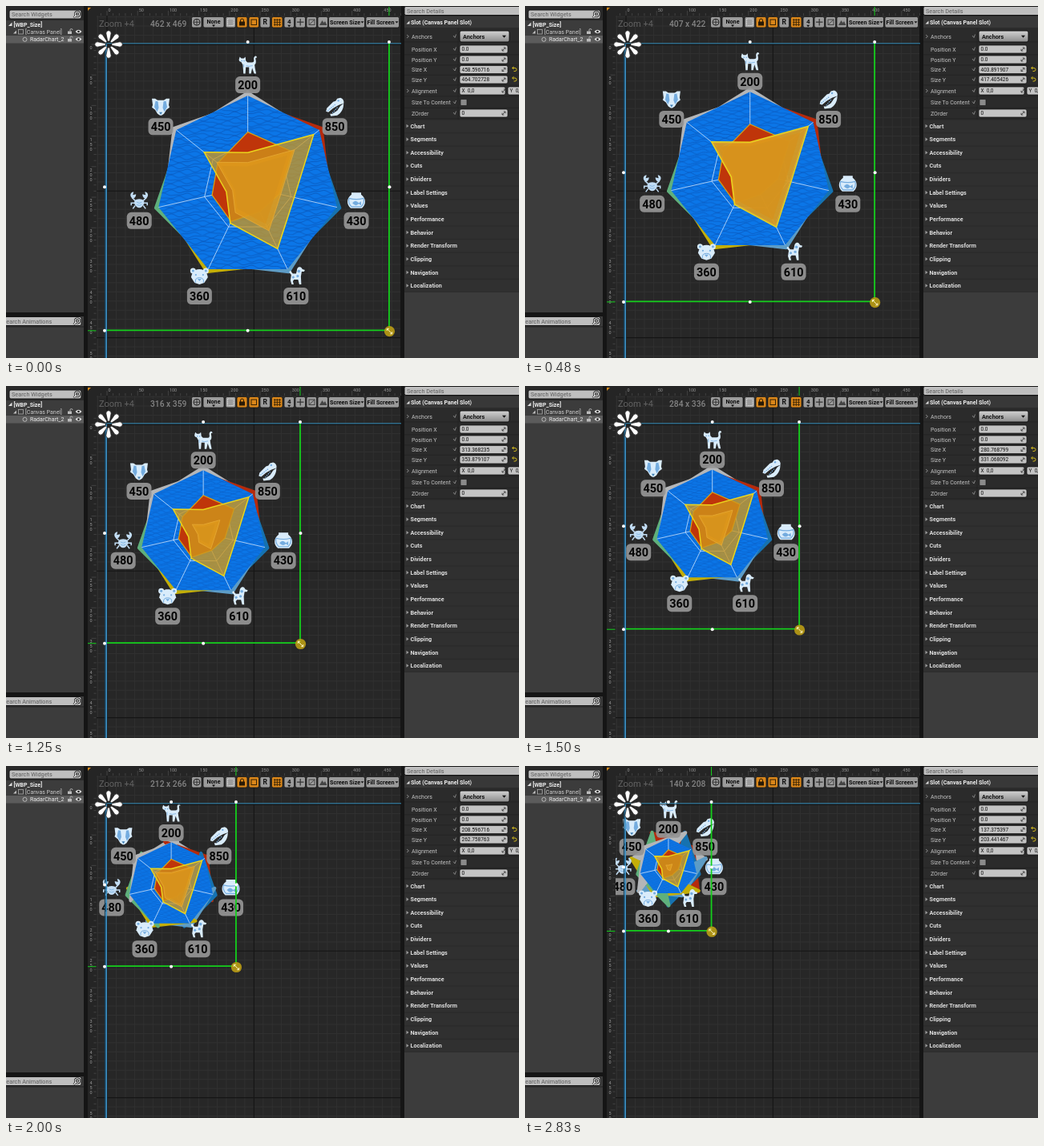
An HTML page for the animation above (2.9 s loop, 640x440 px).

```html
<!DOCTYPE html>
<html lang="en">
<head>
<meta charset="utf-8">
<title>Radar chart resize</title>
<style>
html, body { margin: 0; width: 100%; height: 100%; overflow: hidden; background: #272727; }
svg { display: block; width: 640px; height: 440px; font-family: Roboto, sans-serif; }
</style>
</head>
<body>
<svg id="stage" viewBox="0 0 640 440">
  <defs>
    <clipPath id="view"><path d="M113 12H493V440H113z"/></clipPath>
    <linearGradient id="btn" x2="0" y2="1"><stop stop-color="#d2d2d2"/><stop offset="1" stop-color="#8c8c8c"/></linearGradient>
  </defs>
  <g id="back"></g>
  <g id="chart" clip-path="url(#view)"></g>
  <g id="front"></g>
  <g id="overlay"></g>
  <g id="panels"></g>
  <g id="sizes"></g>
</svg>
<script>
const $ = id => document.getElementById(id);
const LOOP = 2900, SCALE = 0.764, OX = 125.3, OY = 47;

// [step, time] anchors of the screen capture clock
const CLOCK = [[0,0],[1,50],[8,480],[10,620],[15,930],[18,1130],[19,1180],[24,1500],
  [27,1690],[28,1760],[32,2000],[36,2250],[37,2320],[39,2440],[45,2830],[46,2900]];
// [step, size x, size y, dragged height]
const DRAG = [[0,458.596716,464.702728,469],[8,403.891907,417.405426,422],
  [15,352.090118,379.117126,384],[24,280.768799,331.068092,336],
  [32,208.596716,262.758763,266],[39,152.390411,216.453461,220],[45,137.375397,203.441467,208]];

const rect = (x, y, w, h, fill, more = '') =>
  `<rect x="${x}" y="${y}" width="${w}" height="${h}" fill="${fill}" ${more}/>`;
const path = (d, fill, more = '') => `<path d="${d}" fill="${fill}" ${more}/>`;
const line = (d, color, w = 1, more = '') => path(d, 'none', `stroke="${color}" stroke-width="${w}" ${more}`);
const dot = (x, y, r, fill, more = '') => `<circle cx="${x}" cy="${y}" r="${r}" fill="${fill}" ${more}/>`;
const text = (x, y, s, size, fill, more = '') =>
  `<text x="${x}" y="${y}" font-size="${size}" fill="${fill}" ${more}>${s}</text>`;
const BOLD = ' font-weight="700"', MID = ' text-anchor="middle"';

/* ---------- static parts ---------- */

function drawBack() {
  let s = rect(102, 0, 392, 440, '#272727'), minor = '', major = '';
  const gap = 183.3 / 16;
  for (let i = -3; i < 36; i++) {
    const x = 126 + i * gap, y = 48 + i * gap;
    const v = x > 113 && x < 493 ? `M${x} 12V440` : '', h = y > 12 ? `M113 ${y}H493` : '';
    if (i % 16) minor += v + h; else major += v + h;
  }
  s += line(minor, '#313131') + line(major, '#151515', 1.1);
  s += text(116, 26, 'Zoom +4', 11, '#626262');
  return s;
}

function drawRulers() {
  let s = rect(102, 0, 391, 12, '#252525') + rect(102, 12, 10.5, 428, '#252525'), ticks = '';
  for (let i = -1; i < 53; i++) {
    const p = i * 50 * SCALE / 5, len = i % 5 ? 3 : 6;
    if (126 + p < 493) ticks += `M${126 + p} 12v${-len}`;
    ticks += `M112.5 ${48 + p}h${-len}`;
  }
  s += line(ticks, '#555', .6);
  for (let n = 0; n <= 500; n += 50) {
    const p = n * SCALE;
    if (n < 500) s += text(127.5 + p, 7, n, 5.5, '#999');
    [...String(n)].forEach((c, i) => s += text(104.5, 54 + p + i * 6, c, 5.5, '#999'));
  }
  return s + path('M102 2h4l-4 4z', '#d88a1c');
}

function drawFrame() {
  let s = line('M113 46.8H493', '#3585ad', 1.3) + line('M113 48.2H493', '#141414', .8);
  s += line('M123.4 48V440', '#15425e', 1) + line('M125.2 48V440', '#3990c6', 1.7);
  for (let a = 0; a < 360; a += 45)
    s += path('M-1.2 -4L-3.2 -14Q-3 -17 0 -17.3Q3 -17 3.2 -14L1.2 -4z', '#fff',
      `transform="translate(128 48) rotate(${a})" stroke="#222" stroke-width=".7"`);
  return s;
}

function drawToolbar() {
  const box = (x, w, fill = '#9b9b9b') =>
    rect(x, 13.5, w, 13.5, fill, 'rx="2" stroke="#1a1a1a" stroke-width=".8"');
  const orange = '#d9861a', word = (x, s) => text(x, 23, s, 7.2, '#0c0c0c', BOLD);
  const caret = (x, y) => path(`M${x} ${y}h4l-2 2.4z`, '#111');
  return box(231.5, 12.5) + dot(238, 20.2, 4, 'none', 'stroke="#222"') + line('M234 20.2h8M238 16v8', '#222', .8)
    + box(246, 26) + text(259, 21.5, 'None', 7.2, '#0c0c0c', BOLD + MID) + caret(257, 23.6)
    + box(274, 12.5) + rect(276.5, 16, 7.5, 8.5, 'none', 'stroke="#ddd" stroke-dasharray="1.5 .8"')
    + box(288, 13, orange) + rect(291, 19.5, 7, 5, '#2a1a05') + line('M292.5 20v-2a2 2 0 0 1 4 0v2', '#2a1a05')
    + box(303, 12.5, orange) + rect(306, 17, 6.5, 6.5, 'none', 'stroke="#3a2405"')
    + box(317, 12.5) + text(323.2, 23.3, 'R', 8.5, '#111', BOLD + MID)
    + box(331.5, 13.5, orange) + line('M334 17.3h9M334 20.3h9M334 23.3h9M335.2 16v9M338.3 16v9M341.4 16v9', '#3a2405', .9)
    + box(347, 12.5) + text(353.2, 21.6, '4', 8, '#111', BOLD + MID) + caret(351.2, 23.8)
    + box(361, 12.5) + line('M363 20.2h8.5M367.2 16v8.5', '#333', 1.2)
    + box(375, 12.5) + rect(378, 17, 7, 6.5, 'none', 'stroke="#444"') + line('M378 23.5l7 -6.5', '#444')
    + box(389, 12.5) + path('M391 24l3.5 -6 2 3 1.5 -2 2.5 5z', '#444')
    + box(402.5, 45) + word(404, 'Screen Size') + caret(442.5, 19.2)
    + box(449, 41.5) + word(450.5, 'Fill Screen') + caret(485.5, 19.2);
}

const lens = (x, y) => line(`M${x - 2} ${y + 2}l-2.5 2.5`, '#111', 2.4)
  + dot(x, y, 2.8, '#888', 'stroke="#111" stroke-width="2.2"') + dot(x, y, 2.8, 'none', 'stroke="#fff"')
  + line(`M${x - 2} ${y + 2}l-2.3 2.3`, '#fff', 1.2);
const search = (x, y, w, s) => rect(x, y, w, 11, '#bebebe', 'rx="2" stroke="#161616"') + text(x + 3, y + 8.2, s, 7.3, '#5c5c5c');

function drawLeft() {
  const eye = y => path(`M86.5 ${y}q4 -4.5 8 0q-4 4.5 -8 0z`, '#ddd') + dot(90.5, y, 1.3, '#222');
  const lock = y => rect(77, y - 1, 5, 3.5, '#bbb') + line(`M80 ${y - 1}v-1.5a1.5 1.5 0 0 1 3 0`, '#bbb', .9);
  return rect(0, 0, 98, 440, '#3c3c3c') + rect(0, 0, 98, 18, '#2a2a2a') + search(4, 5, 90, 'Search Widgets') + lens(89, 10)
    + path('M3 25h4.5v-4.5z', '#ddd') + text(9.5, 25.5, '[WBP_Size]', 7, '#eee', BOLD)
    + path('M9 34.5h4v-4z', '#bbb') + rect(15.5, 29.5, 6, 5.5, 'none', 'stroke="#aaa" stroke-width=".8"')
    + text(24, 35, '[Canvas Panel]', 7, '#ccc') + lock(32.5) + eye(32)
    + rect(0, 37, 97, 9.5, '#5c5c5c') + dot(23.5, 41.8, 2.5, 'none', 'stroke="#ccc" stroke-width=".8"')
    + text(30, 44.3, 'RadarChart_2', 7, '#eee') + lock(42) + eye(41.6)
    + rect(0, 383, 98, 5, '#151515') + search(-7, 388.5, 101, 'Search Animations') + lens(89, 393.5)
    + rect(0, 400.5, 98, 1, '#222') + rect(97, 0, 5, 440, '#151515');
}

const field = (x, y, w) => rect(x, y - 5, w, 10, '#c4c4c4', 'rx="2" stroke="#111" stroke-width=".7"');
const spin = y => line(`M619 ${y + 2}l4 -4M620.7 ${y - 2}h2.3v2.3M619 ${y - .3}v2.3h2.3`, '#333', .8);

function drawRight() {
  let s = rect(493, 0, 4, 440, '#151515') + rect(497, 0, 143, 440, '#3c3c3c') + rect(497, 0, 143, 358, '#2b2b2b')
    + search(497, 0.5, 150, 'Search Details') + rect(497, 13, 143, 14, '#383838')
    + path('M499.5 22.5h4v-4z', '#ddd') + text(505, 23, 'Slot (Canvas Panel Slot)', 7, '#eee', BOLD);
  const rows = [['Anchors', 38], ['Position X', 54], ['Position Y', 67], ['Size X', 79.5], ['Size Y', 92],
    ['Alignment', 106], ['Size To Content', 120.5], ['ZOrder', 134]];
  rows.forEach(([name, y], i) => {
    s += text(506, y + 2.6, name, 7, '#c4c4c4') + line(`M497 ${y + 6.8}H640`, '#222', .7);
    s += line(`M558 ${y - 1}l2 2.5 1.5 -4`, '#999', .8);
    if (name === 'Anchors' || name === 'Alignment') s += line(`M500 ${y - 2}l2.5 2 -2.5 2`, '#999', .8);
    if (/^(Pos|Size [XY]|ZO)/.test(name)) s += field(566, y, 60) + spin(y);
    if (/^(Pos|ZO)/.test(name)) s += text(568.5, y + 2.4, i === 7 ? '0' : '0.0', 6.5, '#111');
    if (/^Size [XY]/.test(name)) s += line(`M632 ${y - 2}h3a2 2 0 0 1 0 4h-1.5M633.5 ${y - 3.6}l-2 1.6 2 1.6`, '#dfc51b', .9);
  });
  s += line('M564 28V142', '#222', .7)
    + rect(566, 31, 62, 14, 'url(#btn)', 'rx="2" stroke="#111"') + text(570, 40.7, 'Anchors', 7.3, '#111', BOLD)
    + path('M619 36.7h5l-2.5 3z', '#111')
    + field(566, 106, 57) + text(568.5, 108.4, 'X&#160; 0,0', 6.5, '#111') + spin(106)
    + field(626, 106, 30) + text(628.5, 108.4, 'Y&#160; 0,0', 6.5, '#111')
    + rect(567, 116.5, 8, 8, '#8a8a8a', 'rx="1" stroke="#111" stroke-width=".6"');
  ['Chart', 'Segments', 'Accessibility', 'Cuts', 'Dividers', 'Label Settings', 'Values', 'Performance',
    'Behavior', 'Render Transform', 'Clipping', 'Navigation', 'Localization'].forEach((name, i) => {
    const y = 150 + i * 16.63;
    s += rect(497, y - 7.3, 143, 15.2, '#303030') + path(`M499.5 ${y - 2.3}l3 2.3 -3 2.3z`, '#999')
      + text(504.5, y + 2.6, name, 7.2, '#ddd', BOLD);
  });
  return s;
}

/* ---------- chart ---------- */

const PALE = '#d9ecfb', TINT = '#74acdf';
const ICONS = [
  // cat
  path('M-10 -10l2 2h3l2 -2 .6 5 2 2h5.400c2.500 0 3 -1.500 2.500 -4c-.6 -4 3.500 -6 4 -2c-2 -.5 -2 1 -1.500 3c.5 3 0 5 -1.500 6l.5 4 1.500 7h-2.600l-2.400 -7 -1.500 7h-2.400l0 -8h-4l-.6 8h-2.400l-.8 -11 -2 -3.500c-2 -.3 -2.800 -1.500 -2.800 -3z', PALE)
    + line('M-2 1q3 1.500 8 0M-5 -1v4', TINT, .8) + dot(-7.500, -5, .8, TINT) + dot(-4.500, -5, .8, TINT),
  // crocodile
  path('M11 -4c1 -3 -1 -6 -4 -7l-4 1 -2 3 -3 1 -8 8 -1 4 3 1 6 -5 7 -4z', PALE)
    + path('M11 -4l-4 3 -4 6 -6 4 -3 0 1 3 8 -1c5 -3 8 -8 8 -15z', PALE)
    + line('M-9 5l10 -8M-3 8l7 -8', TINT, 1.2, 'stroke-dasharray="1.500 1.200"') + dot(4.500, -7.500, 1.200, TINT),
  // fish bowl
  path('M-6 -10h12v2.500c7 5 6 13 1 17h-14c-5 -4 -6 -12 1 -17z', PALE)
    + line('M-9 -3q9 2.500 18 0c1.500 5 -.5 8 -3 10.500h-12c-2.500 -2.500 -4.500 -5.500 -3 -10.500z', TINT, 1.100)
    + path('M-5 3q4 -5 8 0l3 -2v5l-3 -2q-4 4 -8 -1z', TINT),
  // dog
  path('M3 -11c3 -1.500 4 1 5 2.500l3 1 -1 2h-3l-1 6 .5 10h-2.500l-1.500 -6h-5l-1.500 2 1 4h-2.500l-1.500 -5 1 -7 -2.500 -3c0 -2.500 3 -2.500 3 0l1.500 1.500h4l1 -4c0 -2 1 -3.500 2 -4z', PALE)
    + dot(3.500, -6, 1.800, TINT) + dot(2, 0, 1.600, TINT) + dot(-3.500, 1.500, 1.500, TINT),
  // bear
  dot(-8, -6.500, 3.500, PALE) + dot(8, -6.500, 3.500, PALE)
    + path('M0 -8.500c8 0 9.500 6 10.500 10l-2.500 4 -2 3 -6 2 -6 -2 -2 -3 -2.500 -4c1 -4 2.500 -10 10.500 -10z', PALE)
    + line('M-5 8q-1 -6 5 -6t5 6', TINT, 1) + path('M-2.500 3.500h5l-2.500 3z', TINT) + dot(-4.500, -1.500, 1.100, TINT) + dot(4.500, -1.500, 1.100, TINT)
    + dot(-8, -6.500, 1.500, TINT) + dot(8, -6.500, 1.500, TINT),
  // crab
  path('M0 -2c5 0 7 3 6 6q-2.500 5 -6 5t-6 -5c-1 -3 1 -6 6 -6z', '#c2ddf4')
    + line('M-5 0l-4 -4M5 0l4 -4M-6 3l-4 0v3M6 3l4 0v3M-5 6l-3 4M5 6l3 4', '#c2ddf4', 1.500)
    + path('M-9 -3c-4 -4 -1 -8 2 -8l-1 4 4 -1c0 3 -2 6 -5 5zM9 -3c4 -4 1 -8 -2 -8l1 4 -4 -1c0 3 2 6 5 5z', '#c2ddf4')
    + line('M-3 2q3 2 6 0M-3 5q3 2 6 0', TINT, .8),
  // badger
  path('M-11 -10l4 0 3 2h8l3 -2 4 0 -1 8 1 3 -4 3 -3 5 -3 2h-2l-3 -2 -3 -5 -4 -3 1 -3z', PALE)
    + path('M-6.500 -7l3 .5 1 8 -2 5 -3.500 -6zM6.500 -7l-3 .5 -1 8 2 5 3.500 -6z', TINT) + path('M-2 7h4l-2 3z', '#3f7fb5')
];
const LABELS = [200, 850, 430, 610, 360, 480, 450];
const TIPS = ['#b4b6b8', '#b52a0c', '#1672b0', '#5d9cc6', '#c3ae08', '#5fb07c', '#b4b6b8'];
const RED = [.6, .62, .35, .3, .42, .4, .42];
const GOLD = [.376, .92, .52, .75, .44, .24, .61];
const DIRS = LABELS.map((_, i) => {
  const a = i * 2 * Math.PI / 7;
  return [Math.sin(a), -Math.cos(a)];
});
const poly = pts => 'M' + pts.map(p => p.map(v => v.toFixed(2)).join(' ')).join('L') + 'z';
const ring = (r, vals) => poly(DIRS.map(([x, y], i) => [x * r * (vals ? vals[i] : 1), y * r * (vals ? vals[i] : 1)]));

// Uneven ripples that tile every 80 x 30 units
const ripples = Array.from({ length: 8 }, (_, row) => {
  const pts = [];
  for (let x = 0; x <= 80; x += 2) {
    const a = x / 80 * 2 * Math.PI;
    pts.push(`${x} ${(row * 3.75 + 2 + 1.3 * Math.sin(3 * a + row * 2.1) + .8 * Math.sin(5 * a + row * 4.3)).toFixed(2)}`);
  }
  return 'M' + pts.join('L');
}).join('');

function drawChart(cx, cy, R, pulse) {
  let s = `<pattern id="waves" width="80" height="30" patternUnits="userSpaceOnUse" patternTransform="scale(${R / 114})">`
    + rect(0, 0, 80, 30, '#0b76e8') + line(ripples, '#0858bd', .9) + '</pattern>';
  // Tips keep their size while the chart shrinks
  s += DIRS.map(([x, y], i) => {
    const at = (out, side) => [x * (R + out) - y * side, y * (R + out) + x * side];
    return path(poly([at(3.5, 0), at(-26, 47), at(-26, -47)]), TIPS[i],
      `stroke="${TIPS[i]}" stroke-width="4" stroke-linejoin="round"`);
  }).join('');
  s += path(ring(R), 'url(#waves)');
  s += line(DIRS.map(([x, y]) => `M0 0L${x * R} ${y * R}`).join('') + ring(R * .485), '#d8ebff', 1, 'opacity=".75"');
  s += path(ring(R, RED), '#bf350a', 'stroke="#dca010" stroke-width="1.2"');
  s += path(ring(R, GOLD), `rgba(208,152,28,${.84 - .12 * pulse})`);
  s += path(ring(R * pulse, GOLD), 'rgba(226,156,28,.75)', 'stroke="#e8ab35" stroke-width=".8"');
  s += path(ring(R * Math.max(0, pulse - .11), GOLD), 'rgba(214,146,28,.75)');
  s += line(ring(R, GOLD), '#ead41c', 1.5);
  DIRS.forEach(([x, y], i) => {
    const d = 1.03 * R + 21.3, lx = x * d, ly = y * d + 11.3;
    s += `<g transform="translate(${lx} ${ly})"><g transform="translate(0 -25)">${ICONS[i]}</g>`
      + rect(-15.5, -10.5, 31, 21, '#959595', 'rx="5.5" fill-opacity=".93"')
      + text(0, 5.2, LABELS[i], 14.4, '#050505', BOLD + MID) + '</g>';
  });
  return `<g transform="translate(${cx} ${cy})">${s}</g>`;
}

function drawOverlay(x, y, w, h) {
  const mx = (OX + x) / 2, my = (OY + y) / 2, c = '#14cf1c';
  let s = line(`M102 ${y + .5}H112.5M${x} 1V12`, c, 1) + line(`M126 ${y}H${x}V${OY}`, c, 1.8);
  for (const [px, py] of [[mx, 45], [x, 45], [123, my], [x + .5, my], [123, y + .5], [mx, y + .5]])
    s += dot(px, py, 2, '#fff');
  s += dot(x + .5, y + 1.3, 6.6, '#b79a16', 'opacity=".93"')
    + line(`M${x - 2.5} ${y - 1.7}l6 6M${x - 2.7} ${y + .6}v-2.5h2.5M${x + 3.7} ${y + 2}v2.5h-2.5`, '#fff6c8', 1);
  return s + text(180, 26, `${Math.round(w)} x ${Math.round(h)}`, 10.3, '#848484', 'font-weight="500"');
}

/* ---------- motion ---------- */

function stepAt(t) {
  let i = 0;
  while (i < CLOCK.length - 2 && t >= CLOCK[i + 1][1]) i++;
  const [k0, t0] = CLOCK[i], [k1, t1] = CLOCK[i + 1];
  return k0 + Math.min(k1 - k0 - 1, Math.floor((t - t0) / (t1 - t0) * (k1 - k0) + 1e-6));
}

// Monotone cubic through the drag points
function dragAt(k, col) {
  const slope = i => (DRAG[i + 1][col] - DRAG[i][col]) / (DRAG[i + 1][0] - DRAG[i][0]);
  const tangent = i => {
    if (i === 0) return slope(0);
    if (i === DRAG.length - 1) return 0;
    const a = slope(i - 1), b = slope(i);
    return 2 * a * b / (a + b);
  };
  let i = 0;
  while (i < DRAG.length - 2 && k >= DRAG[i + 1][0]) i++;
  const a = DRAG[i], b = DRAG[i + 1], h = b[0] - a[0], u = (k - a[0]) / h, v = 1 - u;
  return a[col] * (1 + 2 * u) * v * v + tangent(i) * h * u * v * v
    + b[col] * u * u * (3 - 2 * u) - tangent(i + 1) * h * u * u * v;
}

function render(k) {
  const sx = dragAt(k, 1), sy = dragAt(k, 2), w = sx + 3, h = dragAt(k, 3);
  const x = OX + w * SCALE, y = OY + h * SCALE;
  const pulse = (.71 + .52 * k * .063) % 1;
  $('chart').innerHTML = drawChart((OX + x) / 2, (OY + y) / 2, .243 * w + 2, pulse);
  $('overlay').innerHTML = drawOverlay(x, y, w, h);
  $('sizes').innerHTML = text(568.5, 81.9, sx.toFixed(6), 6.5, '#111') + text(568.5, 94.4, sy.toFixed(6), 6.5, '#111');
}

$('back').innerHTML = drawBack();
$('front').innerHTML = drawRulers() + drawFrame() + drawToolbar();
$('panels').innerHTML = drawLeft() + drawRight();

const start = performance.now();
let shown = -1;
function tick() {
  const k = stepAt((performance.now() - start) % LOOP);
  if (k !== shown) render(shown = k);
  requestAnimationFrame(tick);
}
tick();
</script>
</body>
</html>
```
